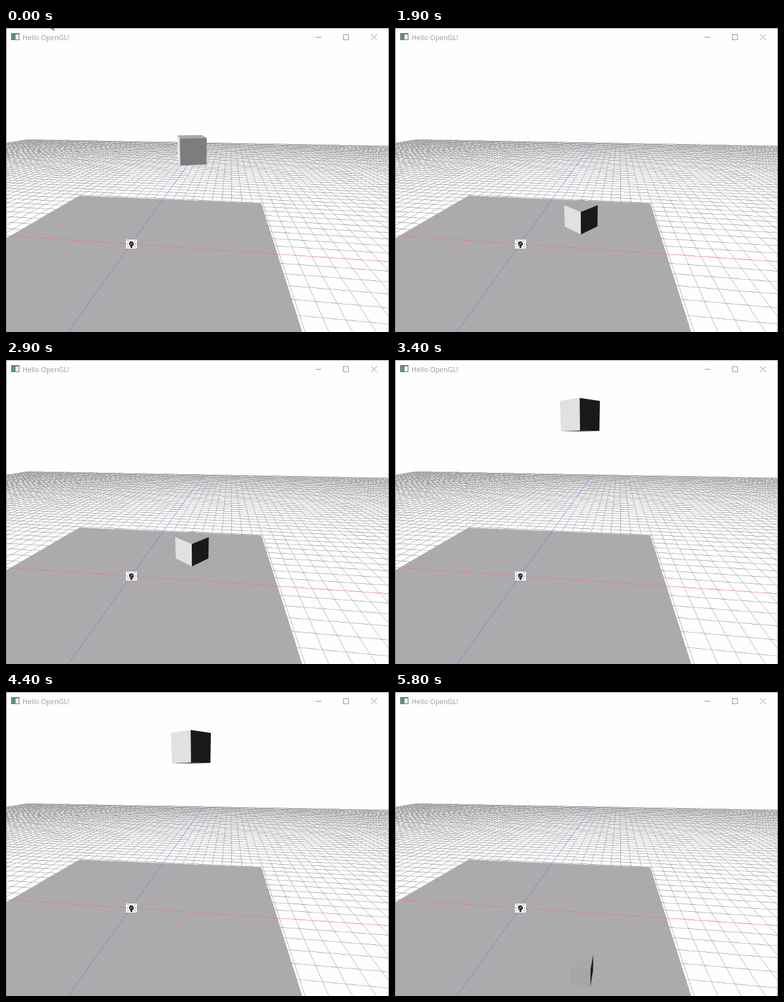
Recreate the animation shown at these times as an HTML page with a canvas. Size 600 by 477 pixels, loop 5900 ms.

```html
<!DOCTYPE html>
<html>
<head>
<meta charset="utf-8">
<style>
  html, body { margin: 0; width: 100%; height: 100%; overflow: hidden; background: #fffeff; }
  canvas { display: block; }
</style>
</head>
<body>
<canvas id="stage" width="600" height="477"></canvas>
<script>
const W = 600, H = 477, LOOP = 5900, STEP = 100;
const FINE = 4 / 3; // the ground is drawn larger, then scaled down
const ctx = document.getElementById('stage').getContext('2d');
const rad = deg => deg * Math.PI / 180;

// Camera: 60 degree field of view, pitched down, principal point (300, 253)
const FOCAL = 389.7, PITCH = rad(18.65), YAW = rad(7.15);
const cosP = Math.cos(PITCH), sinP = Math.sin(PITCH);
const depth = (ahead, drop) => ahead * cosP + drop * sinP;

function project([side, ahead, drop]) {
  const k = FOCAL / depth(ahead, drop);
  return [300 + side * k, 253 + (drop * cosP - ahead * sinP) * k];
}

// Ground coordinates are measured in camera heights
function ground(x, z) {
  return [
    -0.5047 + x * Math.cos(YAW) + z * Math.sin(YAW),
    1.658 + z * Math.cos(YAW) - x * Math.sin(YAW),
    1
  ];
}

function makeCanvas(width, height) {
  const canvas = document.createElement('canvas');
  canvas.width = width;
  canvas.height = height;
  return [canvas, canvas.getContext('2d')];
}

function polygon(g, points, color) {
  g.fillStyle = color;
  g.beginPath();
  points.forEach(p => g.lineTo(...p));
  g.closePath();
  g.fill();
}

function strokePath(g, color, ...lines) {
  g.strokeStyle = color;
  g.beginPath();
  for (const [x1, y1, x2, y2] of lines) {
    g.moveTo(x1, y1);
    g.lineTo(x2, y2);
  }
  g.stroke();
}

// Hard-edged one pixel line between two ground points, cut at the near plane
function groundLine(g, a, b, color) {
  const near = 0.6;
  const za = depth(a[1], a[2]), zb = depth(b[1], b[2]);
  if (za < near && zb < near) return;
  const cut = () => a.map((v, i) => v + (b[i] - v) * (near - za) / (zb - za));
  const [x1, y1] = project(za < near ? cut() : a).map(v => v * FINE);
  const [x2, y2] = project(zb < near ? cut() : b).map(v => v * FINE);
  const steps = Math.ceil(Math.max(Math.abs(x2 - x1), Math.abs(y2 - y1)));
  g.fillStyle = color;
  for (let i = 0; i <= steps; i++) {
    const x = Math.floor(x1 + (x2 - x1) * i / steps);
    const y = Math.floor(y1 + (y2 - y1) * i / steps);
    if (x >= 0 && x < W * FINE && y < H * FINE) g.fillRect(x, y, 1, 1);
  }
}

function makeGround() {
  const [canvas, g] = makeCanvas(W * FINE, H * FINE);
  const cell = 0.1094, far = 50 * cell;
  const floor = [[115, 263], [400, 275], [464, 477], [0, 477], [0, 330]];
  g.fillStyle = '#fffeff';
  g.fillRect(0, 0, canvas.width, canvas.height);
  for (let i = -50; i <= 50; i++) {
    const at = i * cell;
    groundLine(g, ground(at, -far), ground(at, far), '#a6a5a7');
    groundLine(g, ground(-far, at), ground(far, at), '#a6a5a7');
  }
  polygon(g, floor.map(p => p.map(v => v * FINE)), '#acaaad');
  groundLine(g, ground(-far, 0), ground(far, 0), '#f07878');
  groundLine(g, ground(0, -far), ground(0, far), '#7878f0');
  return canvas;
}

function drawBulb(g) {
  g.fillStyle = '#fff';
  g.fillRect(188, 332, 17, 14);
  strokePath(g, '#666', [189, 339, 191, 339], [202, 339, 204, 339],
    [190, 333, 192, 335], [203, 333, 201, 335], [190, 344, 192, 342], [203, 344, 201, 342]);
  g.fillStyle = '#2a2a2a';
  g.beginPath();
  g.arc(196.5, 338.5, 3.8, 0, 7);
  g.fill();
  g.fillRect(195, 342, 3, 3);
  strokePath(g, '#bbb', [194, 340, 199, 337]);
}

function drawWindow(g) {
  g.fillStyle = '#fffeff';
  g.fillRect(0, 0, W, 28);
  g.fillStyle = '#777';
  g.fillRect(8, 8, 13, 11);
  g.fillStyle = '#5b9090';
  g.fillRect(9, 10, 6, 8);
  g.fillStyle = '#f4f4f4';
  g.fillRect(15, 10, 5, 8);
  g.fillStyle = '#999';
  g.font = '10.8px "Open Sans", "Noto Sans", sans-serif';
  g.fillText('Hello OpenGL!', 26, 18.5);
  strokePath(g, '#999', [485, 14.5, 494, 14.5], [572, 10, 581, 19], [581, 10, 572, 19]);
  g.strokeRect(528.5, 10.5, 8, 8);
  strokePath(g, '#aaa', [0, 0.5, W, 0.5]);
  strokePath(g, '#888', [0.5, 0, 0.5, H], [599.5, 0, 599.5, H]);
}

function makeScene() {
  const [canvas, g] = makeCanvas(W, H);
  g.drawImage(makeGround(), 0, 0, W, H);
  drawBulb(g);
  drawWindow(g);
  return canvas;
}

// Cube: drop below eye level for each tenth of its one second bounce
const DROPS = [0.169, 0.02, -0.07, -0.105, -0.075, 0.06, 0.25, 0.56, 0.953, 0.462];
const SIZE = 0.103, SIDE = -0.024, LIGHT = rad(67.7);

function gray(level) {
  const v = Math.round(255 * level);
  return `rgb(${v},${v - 2},${v + 1})`;
}

function drawCube(tick) {
  const drop = DROPS[tick % 10], turn = rad(80.5 + 36 * tick);
  const half = SIZE / 2, reach = half * Math.SQRT2, quarter = Math.PI / 2;
  const corner = (angle, dy) =>
    [SIDE - reach * Math.sin(angle), 1 - reach * Math.cos(angle), drop + dy];
  const ring = dy => [0, 1, 2, 3].map(i => project(corner(turn + (i + 0.5) * quarter, dy)));
  const top = ring(-half), bottom = ring(half);

  if (drop > half) polygon(ctx, top, gray(0.667));
  if (drop < -half) polygon(ctx, bottom, gray(0.1));
  for (let i = 0; i < 4; i++) {
    const j = (i + 3) % 4, angle = turn + i * quarter;
    const facing = SIDE * Math.sin(angle) + Math.cos(angle) > half;
    if (!facing) continue;
    const lit = Math.cos(angle - LIGHT);
    const level = lit > 0 ? 0.37 + 0.56 * lit : 0.1;
    polygon(ctx, [top[j], top[i], bottom[i], bottom[j]], gray(level));
  }
}

function drawPointer() {
  polygon(ctx, [[70, 0], [77, 0], [74, 1], [76, 4], [74, 4], [72, 1], [70, 2]], '#555');
}

const scene = makeScene();
const start = performance.now();

function frame() {
  const tick = Math.floor((performance.now() - start) % LOOP / STEP);
  ctx.drawImage(scene, 0, 0);
  drawCube(tick);
  if (tick === 0) drawPointer();
  requestAnimationFrame(frame);
}
frame();
</script>
</body>
</html>
```
